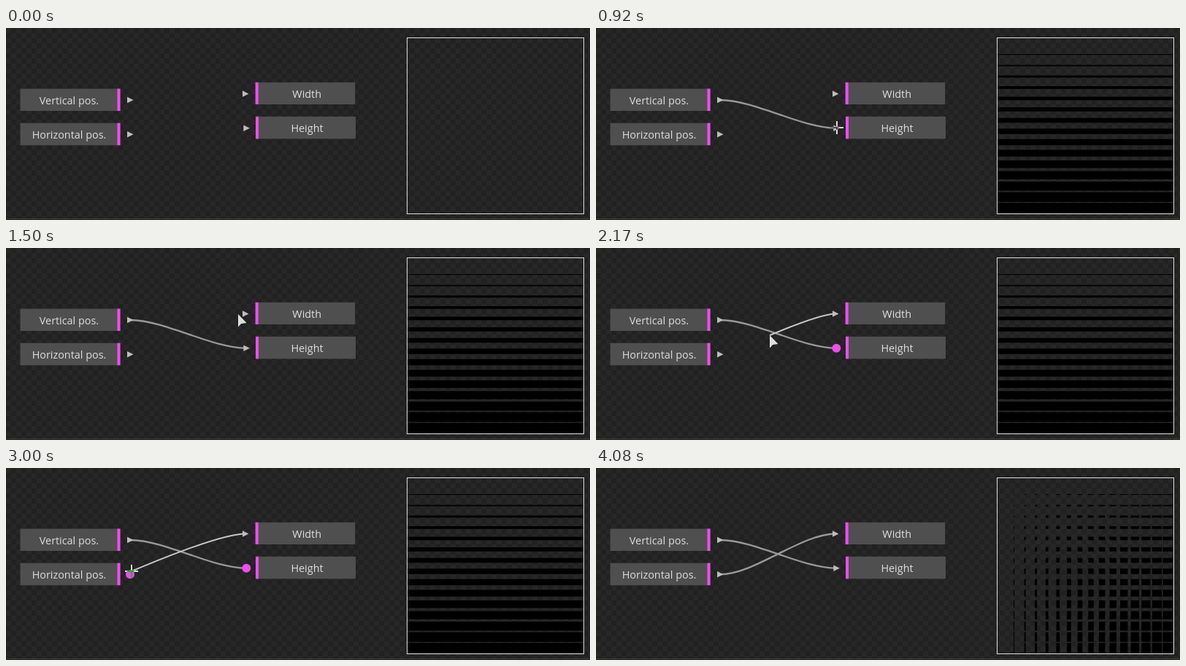
Recreate the animation shown at these times as an HTML page. Size 800 by 264 pixels, loop 4500 ms.

```html
<!DOCTYPE html>
<html lang="en">
<head>
<meta charset="utf-8">
<title>Linking node ports</title>
<style>
  html, body { margin: 0; width: 100%; height: 100%; overflow: hidden; background: #222; }
  svg { display: block; width: 100%; height: 100%; }
  text { font: 14.4px "Open Sans", "Noto Sans", sans-serif; fill: #dedede; text-anchor: middle; }
  .link { fill: none; stroke: #999; stroke-width: 2.3; }
  .drag { stroke: #c8c8c8; stroke-width: 2; }
  .cross { fill: none; stroke: #fff; stroke-width: 2; mix-blend-mode: difference; }
</style>
</head>
<body>
<svg id="stage" viewBox="0 0 800 264">
  <defs>
    <pattern id="checker" width="14" height="14" patternUnits="userSpaceOnUse">
      <rect width="14" height="14" fill="#222122"/>
      <path d="M0 0h7v14h7v-7h-14z" fill="#282728"/>
    </pattern>
  </defs>
  <rect width="800" height="264" fill="url(#checker)"/>
  <rect y="262" width="800" height="1" fill="#3e3e3e"/>
</svg>
<script>
const LOOP = 4500, FPS = 12, CELLS = 16;
const PINK = '#f04cf0';
const stage = document.getElementById('stage');

function add(name, attrs, parent = stage) {
  const el = document.createElementNS('http://www.w3.org/2000/svg', name);
  for (const key in attrs) el.setAttribute(key, attrs[key]);
  return parent.appendChild(el);
}
const show = (el, on) => el.setAttribute('visibility', on ? 'visible' : 'hidden');

// Preview: each cell's bar grows with its index
const preview = { x: 550, y: 14, size: 241 };
const cell = preview.size / CELLS;
function barsPath(useWidth) {
  let d = '';
  for (let row = 1; row < CELLS; row++) {
    const h = cell * row / CELLS;
    const y = preview.y + (row + 0.5) * cell - h / 2;
    if (!useWidth) {
      d += `M${preview.x} ${y}h${preview.size}v${h}h${-preview.size}z`;
      continue;
    }
    for (let col = 1; col < CELLS; col++) {
      const w = cell * col / CELLS;
      d += `M${preview.x + (col + 0.5) * cell - w / 2} ${y}h${w}v${h}h${-w}z`;
    }
  }
  return d;
}
const rows = add('path', { d: barsPath(false) });
const grid = add('path', { d: barsPath(true) });
add('rect', { x: 549.5, y: 13.5, width: 242, height: 242, fill: 'none', stroke: '#dcdcdc' });

// Nodes
function node(label, x, y, w, h, stripX) {
  add('rect', { x, y, width: w, height: h, fill: '#4f4f4f' });
  add('rect', { x: stripX, y, width: 4, height: h, fill: PINK });
  add('text', { x: stripX > x ? x + 67 : x + 70.5, y: y + 21.5 }).textContent = label;
}
node('Vertical pos.', 19.5, 83.5, 137, 30.5, 152.5);
node('Horizontal pos.', 19.5, 130.7, 137, 30.5, 152.5);
node('Width', 341.7, 74.8, 136.5, 30.2, 341.7);
node('Height', 342, 121.8, 137, 30.5, 342);

const ports = {
  vertical: { x: 170, y: 99 },
  horizontal: { x: 170, y: 146.3 },
  width: { x: 328, y: 90.5 },
  height: { x: 329.3, y: 137.7 }
};

// Links
function settledPath(a, b) {
  const pull = (b.x - a.x) * 0.3;
  return `M${a.x} ${a.y}C${a.x + pull} ${a.y} ${b.x - pull} ${b.y} ${b.x} ${b.y}`;
}
function loosePath(from, to) {
  return `M${from.x} ${from.y}Q${from.x + (to.x - from.x) * 0.22} ${from.y} ${to.x} ${to.y}`;
}
const heightLink = add('path', { class: 'link', d: settledPath(ports.vertical, ports.height) });
const widthLink = add('path', { class: 'link', d: settledPath(ports.horizontal, ports.width) });
const dragLink = add('path', { class: 'link drag' });

for (const port of Object.values(ports)) {
  add('path', { d: `M${port.x - 4} ${port.y - 4.3}l8.5 4.3l-8.5 4.3z`, fill: '#bdbdbd' });
  port.dot = add('circle', { cx: port.x, cy: port.y, r: 6, fill: PINK });
}

const arrow = add('path', { d: 'M0 0V17.5L4.2 13L11.5 12z', fill: '#dedede' });
const cross = add('path', { d: 'M-9 0H9M0 -9V9', class: 'cross' });

// Pointer route: step, x, y
const route = [
  [3, 118, 128], [4, 167, 100], [5, 186, 101], [6, 250, 118], [7, 311.5, 142],
  [8, 327, 140], [9, 330, 137], [13, 330, 137], [16, 322, 112], [18, 318, 91],
  [19, 326, 91], [21, 326, 91], [23, 296, 100], [26, 238, 120], [31, 197, 133],
  [35, 174, 141], [36, 172, 142], [46, 172, 142], [48, 160, 142]
];
function pointerAt(step) {
  const i = route.findIndex(key => key[0] >= step);
  if (i < 1) return { x: route[0][1], y: route[0][2] };
  const [s0, x0, y0] = route[i - 1], [s1, x1, y1] = route[i];
  const k = (step - s0) / (s1 - s0);
  return { x: x0 + (x1 - x0) * k, y: y0 + (y1 - y0) * k };
}

function draw(step) {
  const pointer = pointerAt(step);
  const visible = step >= 3 && step < 49;
  const near = port => Math.hypot(port.x - pointer.x, port.y - pointer.y) < 7;
  const hovering = Object.values(ports).some(near);
  const firstDrag = step >= 5 && step < 10;
  const secondDrag = step >= 21 && step < 37;

  show(rows, step >= 10 && step < 37);
  show(grid, step >= 37);
  show(heightLink, step >= 10);
  show(widthLink, step >= 37);
  show(dragLink, firstDrag || secondDrag);
  dragLink.setAttribute('d', loosePath(firstDrag ? ports.vertical : ports.width, pointer));

  show(ports.vertical.dot, false);
  show(ports.width.dot, false);
  show(ports.height.dot, secondDrag || firstDrag && near(ports.height));
  show(ports.horizontal.dot, secondDrag && near(ports.horizontal));

  show(arrow, visible && !hovering);
  show(cross, visible && hovering);
  for (const cursor of [arrow, cross])
    cursor.setAttribute('transform', `translate(${pointer.x} ${pointer.y})`);
}

const start = performance.now();
function tick() {
  const time = (performance.now() - start) % LOOP;
  draw(Math.floor((time + 5) * FPS / 1000) % (LOOP * FPS / 1000));
  requestAnimationFrame(tick);
}
tick();
</script>
</body>
</html>
```
